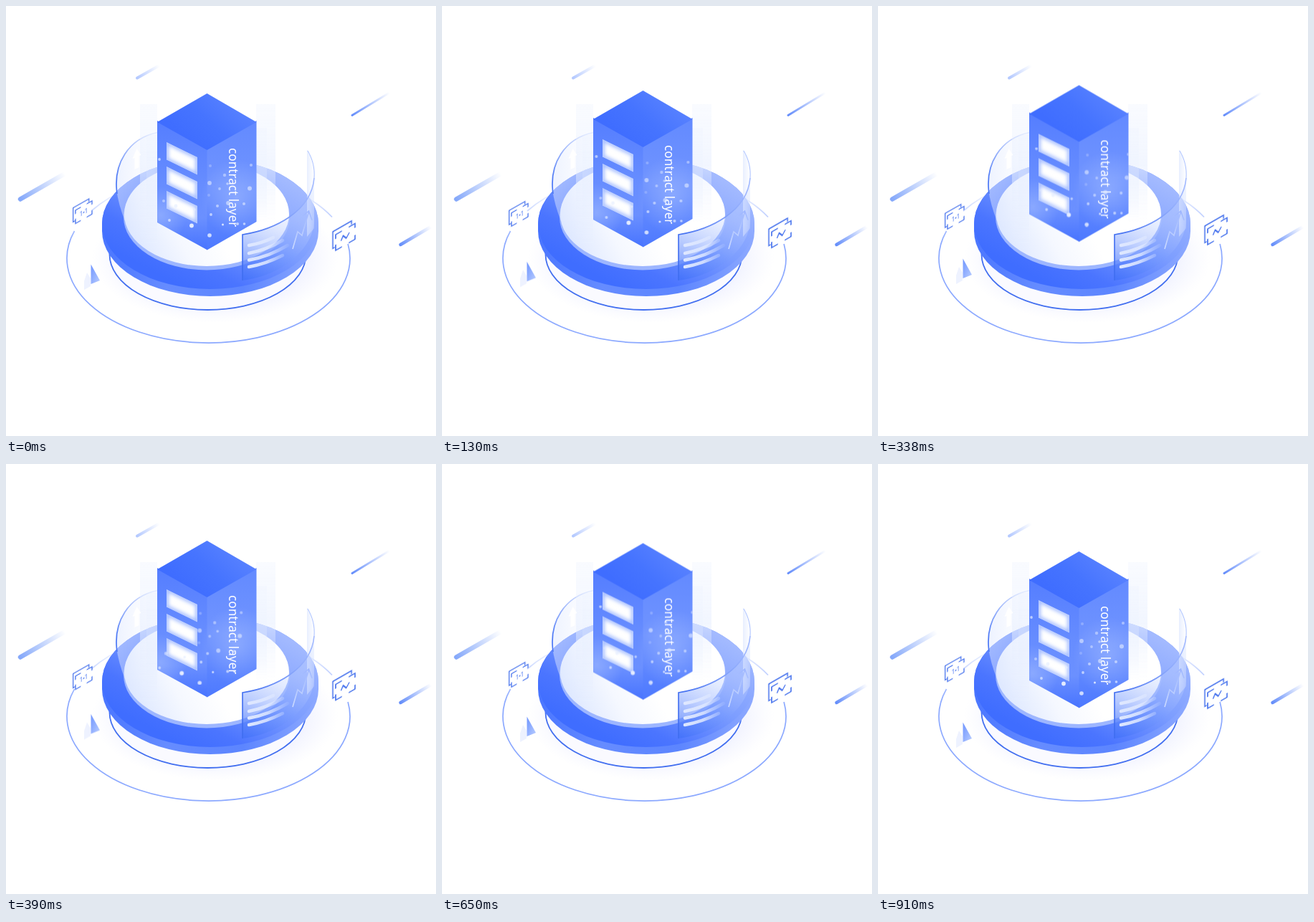
These frames come from a looping animation (600x600 px, 1040 ms). An HTML page:

```html
<!DOCTYPE html>
<html lang="en">
<head>
<meta charset="utf-8">
<title>Contract layer</title>
<style>
  html, body { margin: 0; width: 100%; height: 100%; overflow: hidden; background: #fff; }
  svg { display: block; width: 100vw; height: 100vh; }
  text { font-family: "Noto Sans", "Open Sans", sans-serif; }
</style>
</head>
<body>
<svg viewBox="0 0 600 600" fill="none">
  <defs>
    <linearGradient id="ring" gradientUnits="userSpaceOnUse" x1="340" y1="215" x2="245" y2="392">
      <stop stop-color="#a3baff"/><stop offset=".45" stop-color="#7c9dff"/>
      <stop offset=".8" stop-color="#4b75ff"/><stop offset="1" stop-color="#3f6dff"/>
    </linearGradient>
    <linearGradient id="side" gradientUnits="userSpaceOnUse" x1="134" y1="0" x2="436" y2="0">
      <stop stop-color="#4a76ff"/><stop offset=".3" stop-color="#668cff"/>
      <stop offset=".65" stop-color="#5c85ff"/><stop offset="1" stop-color="#8eaaff"/>
    </linearGradient>
    <linearGradient id="orbit" gradientUnits="userSpaceOnUse" x1="0" y1="262" x2="0" y2="330">
      <stop stop-color="#8ca9ff" stop-opacity=".15"/><stop offset="1" stop-color="#8ca9ff"/>
    </linearGradient>
    <linearGradient id="floor" gradientUnits="userSpaceOnUse" x1="165" y1="320" x2="270" y2="265">
      <stop stop-color="#dbe6ff"/><stop offset=".55" stop-color="#f5f8ff"/><stop offset="1" stop-color="#fff"/>
    </linearGradient>
    <radialGradient id="shade">
      <stop offset=".72" stop-color="#e6e9ff" stop-opacity=".55"/><stop offset="1" stop-color="#eef0ff" stop-opacity="0"/>
    </radialGradient>
    <linearGradient id="glass" x1="0" y1="0" x2="1" y2="0">
      <stop stop-color="#dce6ff" stop-opacity=".85"/><stop offset="1" stop-color="#f2f6ff" stop-opacity=".25"/>
    </linearGradient>
    <linearGradient id="rim" gradientUnits="userSpaceOnUse" x1="154" y1="240" x2="211" y2="176">
      <stop stop-color="#4c78f5"/><stop offset="1" stop-color="#b6c9ff" stop-opacity=".4"/>
    </linearGradient>
    <linearGradient id="beam" x1="0" y1="0" x2="0" y2="1">
      <stop stop-color="#e9f0ff" stop-opacity=".4"/><stop offset=".5" stop-color="#e6eeff" stop-opacity=".8"/>
      <stop offset="1" stop-color="#e6eeff" stop-opacity="0"/>
    </linearGradient>
    <linearGradient id="panel" gradientUnits="userSpaceOnUse" x1="345" y1="385" x2="385" y2="290">
      <stop stop-color="#4674fa" stop-opacity=".85"/><stop offset=".5" stop-color="#7a9dff" stop-opacity=".5"/>
      <stop offset="1" stop-color="#cbdaff" stop-opacity=".3"/>
    </linearGradient>
    <linearGradient id="panelEdge" gradientUnits="userSpaceOnUse" x1="330" y1="0" x2="431" y2="0">
      <stop stop-color="#3f6df0"/><stop offset="1" stop-color="#a3baff"/>
    </linearGradient>
    <linearGradient id="bar" gradientUnits="userSpaceOnUse" x1="336" y1="0" x2="394" y2="0">
      <stop stop-color="#dfe8ff"/><stop offset=".5" stop-color="#dfe8ff" stop-opacity=".85"/>
      <stop offset="1" stop-color="#dfe8ff" stop-opacity=".1"/>
    </linearGradient>
    <linearGradient id="chart" gradientUnits="userSpaceOnUse" x1="0" y1="339" x2="0" y2="286">
      <stop stop-color="#cddbff"/><stop offset="1" stop-color="#9db6ff"/>
    </linearGradient>
    <linearGradient id="roof" gradientUnits="userSpaceOnUse" x1="255" y1="190" x2="310" y2="130">
      <stop stop-color="#3f6dff"/><stop offset=".5" stop-color="#4674ff"/><stop offset="1" stop-color="#5680ff"/>
    </linearGradient>
    <linearGradient id="left" gradientUnits="userSpaceOnUse" x1="0" y1="162" x2="0" y2="340">
      <stop stop-color="#557eff"/><stop offset=".5" stop-color="#678dff"/>
      <stop offset=".75" stop-color="#6b90ff"/><stop offset="1" stop-color="#4874ff"/>
    </linearGradient>
    <linearGradient id="right" gradientUnits="userSpaceOnUse" x1="0" y1="162" x2="0" y2="340">
      <stop stop-color="#638aff"/><stop offset=".5" stop-color="#7094ff"/><stop offset="1" stop-color="#4d79ff"/>
    </linearGradient>
    <radialGradient id="glow">
      <stop stop-color="#a9c1ff" stop-opacity=".5"/><stop offset="1" stop-color="#a9c1ff" stop-opacity="0"/>
    </radialGradient>
    <linearGradient id="pyramid" x1="0" y1="0" x2="1" y2="1">
      <stop stop-color="#6f95ff"/><stop offset="1" stop-color="#b9cdff"/>
    </linearGradient>
    <clipPath id="hull"><path d="M280.5 122L349.5 162V301L280.5 340.5L211 302V162Z"/></clipPath>
    <clipPath id="pane"><path d="M224 190L267 211V235.500L224 214.500Z"/></clipPath>
    <filter id="soft" x="-20%" y="-20%" width="140%" height="140%"><feGaussianBlur stdDeviation="2.8"/></filter>
    <g id="window" clip-path="url(#pane)">
      <path d="M224 190L267 211V235.500L224 214.500Z" fill="#fff"/>
      <path d="M224 190L267 211V235.500L224 214.500Z" stroke="#a9c0ff" stroke-width="6" filter="url(#soft)"/>
    </g>
    <g id="frame" stroke="#3a69ec" stroke-width="1.700">
      <path d="M-1.5 17H-4.6V-6.3H25.4V-1.5"/>
      <path d="M0 6V0H10M21 0H31V6M31 16V22H21M10 22H0V14"/>
    </g>
  </defs>

  <g id="streaks"></g>

  <ellipse cx="292" cy="352" rx="172" ry="90" fill="url(#shade)"/>
  <path d="M477.100 332A197.500 118 0 1 1 95.500 314M119 286A197.500 118 0 0 1 455 294.500" stroke="url(#orbit)" stroke-width="1.700"/>

  <ellipse cx="281.500" cy="346.500" rx="137" ry="77.500" fill="#fafaff" stroke="#416ef0" stroke-width="1.800"/>
  <path d="M134 304A151 91 0 0 1 436 304V314A151 91 0 0 1 134 314Z" fill="url(#side)"/>
  <ellipse cx="285" cy="304" rx="151" ry="91" fill="url(#ring)"/>
  <ellipse cx="280" cy="294.500" rx="116" ry="74" fill="#9db6ff"/>
  <ellipse cx="280" cy="290.500" rx="115" ry="72.500" fill="url(#floor)"/>

  <path d="M154 256C151 222 171 184 211 176V300L166 300C160 285 156 270 154 256Z" fill="url(#glass)" opacity=".6"/>
  <path d="M155 262C149 220 171 185 211 176.500" stroke="url(#rim)" stroke-width="1.700"/>
  <path d="M420 200C427 212 431 224 430 240V310L420 322Z" fill="url(#glass)" opacity=".8"/>
  <path d="M421 202C428 214 431 226 430 240" stroke="#a9c0ff"/>

  <g fill="url(#beam)" opacity=".65">
    <rect x="187" y="137" width="24" height="195"/>
    <rect x="196" y="180" width="15" height="150"/>
    <rect x="349" y="137" width="27" height="165"/>
    <rect x="349" y="170" width="15" height="130"/>
  </g>
  <path d="M182.500 199L188.500 208L185.500 209V225L179.500 228V212L176.500 213Z" fill="#fff"/>

  <g id="tower">
    <path d="M211 160L281 199V340.500L211 302Z" fill="url(#left)"/>
    <path d="M349.500 160L280.500 199V340.500L349.500 301Z" fill="url(#right)"/>
    <g clip-path="url(#hull)">
      <ellipse cx="322" cy="268" rx="50" ry="54" fill="url(#glow)"/>
      <ellipse cx="216" cy="292" rx="36" ry="40" fill="url(#glow)"/>
    </g>
    <path d="M280.500 122L349.500 162L280.500 201L211 162Z" fill="url(#roof)"/>
    <use href="#window"/><use href="#window" y="34"/><use href="#window" y="68"/>
    <text transform="translate(310.500 198) rotate(90)" font-size="17.200" fill="#fff">contract layer</text>
    <g clip-path="url(#hull)"><g id="dots" fill="#e4ecff"></g></g>
  </g>

  <path d="M330 319C375 312 426 287 430 240V300C428 340 385 376 330 383Z" fill="url(#panel)"/>
  <path d="M330 383V319C375 312 426 287 430 240" stroke="url(#panelEdge)" stroke-width="1.600"/>
  <path d="M339 334Q357 331 373 323M339 345Q364 340 386 327M339 354.500Q366 350 393 334M339 364Q362 360 386 348" stroke="url(#bar)" stroke-width="4.500" stroke-linecap="round"/>
  <path d="M400 339L407 315L413 320L422.500 287M414 293L422.500 286L427 299" stroke="url(#chart)" stroke-width="1.600"/>

  <g id="cone">
    <path d="M113 372L118 380V391L109 396V384Z" fill="#eef2ff"/>
    <path d="M118.500 360.500L131 383L118.500 388Z" fill="url(#pyramid)"/>
  </g>

  <g id="leftIcon">
    <g transform="matrix(.74 -.42 0 .84 97 285)">
      <use href="#frame"/>
      <text x="15.500" y="14.500" font-size="10" text-anchor="middle" fill="#4472f0">1•1</text>
    </g>
  </g>
  <g id="rightIcon">
    <g transform="matrix(.87 -.5 0 1 460 319)">
      <use href="#frame"/>
      <path d="M8.500 13L12 7.500L17 13.500L22 8" stroke="#3a69ec" stroke-width="1.800"/>
    </g>
  </g>
</svg>

<script>
const $ = id => document.getElementById(id);

function add(parent, tag, attrs) {
  const el = document.createElementNS("http://www.w3.org/2000/svg", tag);
  for (const key in attrs) el.setAttribute(key, attrs[key]);
  parent.append(el);
  return el;
}

// Streaks fade from a rounded tail to a faint tip: x, y, tip x, tip y, width, colour
[
  [183, 100.5, 214, 83, 4, "#b4c9ff"],
  [483, 152.5, 535, 121, 2.8, "#648dfb"],
  [20, 269.5, 82, 234, 6.5, "#86a9fa"],
  [550.5, 333, 593, 308, 4.5, "#668ffa"]
].forEach(([x1, y1, x2, y2, width, colour], i) => {
  const fade = add($("streaks"), "linearGradient",
    { id: "streak" + i, gradientUnits: "userSpaceOnUse", x1, y1, x2, y2 });
  add(fade, "stop", { "stop-color": colour });
  add(fade, "stop", { offset: 1, "stop-color": colour, "stop-opacity": 0 });
  add($("streaks"), "path", {
    d: `M${x1} ${y1}L${x2} ${y2}`, stroke: `url(#streak${i})`,
    "stroke-width": width, "stroke-linecap": "round"
  });
});

// Sparkles: x, y, radius, opacity
[
  [214, 214, 1.9, .7], [285, 223, 2, .3], [305, 236, 2.2, .5], [342, 222, 2.1, .5],
  [284, 247, 2.9, .6], [309, 248, 1.8, .6], [298, 255, 1.9, .5], [340, 254.5, 3, .6],
  [283, 264, 2, .25], [310, 275, 2.9, .6], [295, 279, 2, .6], [332, 276, 2, .6],
  [220, 272, 2, .5], [237, 279, 2.4, .6], [263, 284, 1.8, .7], [286, 291, 1.9, .7],
  [228, 299, 1.9, .7], [259, 306.5, 2.9, 1], [284, 320, 2.8, .85],
  [302.5, 305, 1.5, .9], [323, 304, 2, .7], [332.5, 304, 1.8, .7]
].forEach(([cx, cy, r, opacity]) => add($("dots"), "circle", { cx, cy, r, opacity }));

// Four held poses, played up and back down
const order = [0, 1, 2, 3, 3, 2, 1, 0];

function bob(id, poses) {
  const frames = [...order, 0].map((pose, i) => ({
    offset: i / order.length,
    easing: "steps(1, end)",
    transform: `translate(${poses[pose][0]}px, ${poses[pose][1]}px)`
  }));
  $(id).animate(frames, { duration: 1040, iterations: Infinity });
}

const lift = (...heights) => heights.map(y => [0, y]);

bob("tower", lift(0, -4, -11.5, -15));
bob("dots", [[0, 0], [1.4, 0], [7.2, -3.5], [-13.8, .4]]);
bob("cone", lift(0, -3.7, -8, -11.5));
bob("leftIcon", lift(0, 3.7, 7.7, 11));
bob("rightIcon", lift(0, -3.8, -8, -11.5));
</script>
</body>
</html>
```
